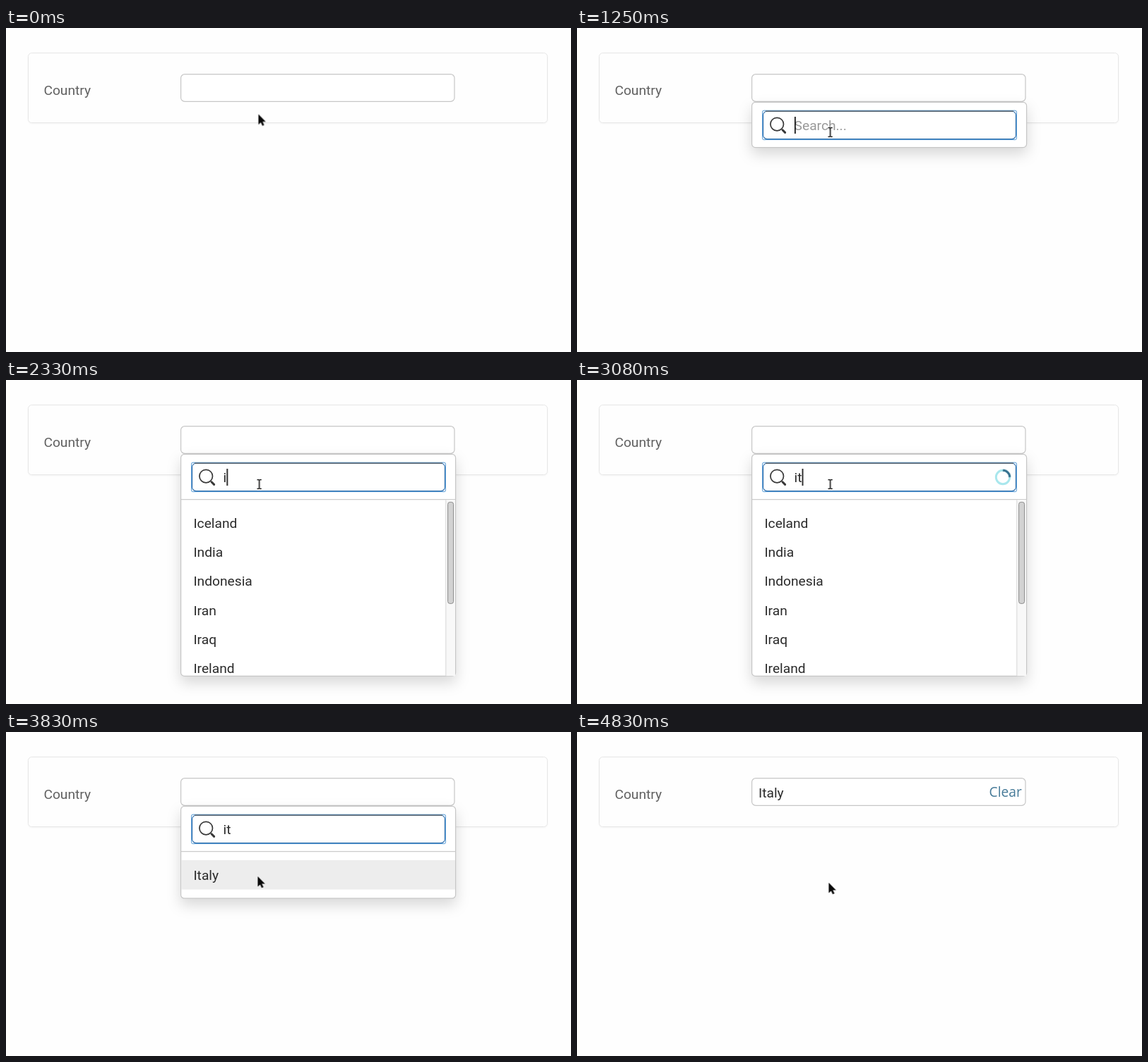
Write an HTML page that moves like this. It is 800x460 px and loops after 6010 ms.

```html
<!DOCTYPE html>
<html lang="en">
<head>
<meta charset="utf-8">
<title>Country picker</title>
<style>
  html, body { margin: 0; width: 100%; height: 100%; overflow: hidden; background: #fefefe; }
  svg { display: block; width: 800px; height: 460px; }
  text { font: 19.2px Roboto, sans-serif; fill: #2b2b2b; }
  .label { fill: #616161; }
  .hint { fill: #999; }
  .clear { font-family: "Open Sans", sans-serif; fill: #467a98; }
  .card { fill: #fefefe; stroke: #e6e6e6; filter: drop-shadow(0 1px 1px rgba(0, 0, 0, .04)); }
  .box { fill: #fff; stroke: #c6c6c6; stroke-width: 1.2; }
  .shadow { filter: drop-shadow(0 9px 9.6px rgba(0, 0, 0, .15)); }
  .line { fill: none; stroke: #ccc; stroke-width: 1.2; }
  .ring { fill: none; stroke: #4a94d4; }
  .inner { fill: none; stroke: #2b6cab; stroke-width: 1.1; }
  .icon { fill: none; stroke: #383838; stroke-width: 1.7; stroke-linecap: round; }
  .spin { fill: none; stroke: #a9e7ed; stroke-width: 2.9; }
  #arc { stroke: #356f8d; transform-origin: 603px 138px; }
  .pointer { fill: #0a0a0a; stroke: #fff; stroke-width: .9; paint-order: stroke; filter: drop-shadow(.8px .8px .5px rgba(0, 0, 0, .35)); }
</style>
</head>
<body>
<svg viewBox="0 0 800 460">
  <rect class="card" x="31.5" y="35.5" width="735" height="99" rx="5"/>
  <text class="label" x="53.4" y="95">Country</text>
  <rect class="box" x="247.6" y="65.6" width="387.4" height="38.8" rx="5.5"/>
  <g id="chosen">
    <text x="257" y="92.5">Italy</text>
    <text class="clear" x="583.6" y="92.3">Clear</text>
  </g>

  <g id="popup">
    <rect id="panel" class="box shadow" x="247.6" y="105.4" width="389" height="64.2" rx="5"/>
    <path id="divider" class="line" d="M248 169.6H636"/>

    <rect class="ring" x="262.6" y="117.2" width="359.8" height="41.4" rx="2"/>
    <rect class="inner" x="263.6" y="118.2" width="357.8" height="39.4" rx="5.5"/>
    <path class="line" style="stroke:#5c5c5c" d="M267 118.2H618"/>
    <circle class="icon" cx="283.2" cy="136.6" r="9.3"/>
    <path class="icon" style="stroke-width:3" d="M291 144.8L294.6 148.4"/>

    <text class="hint" id="hint" x="307.6" y="144.8">Search...</text>
    <text id="typedI" x="307.6" y="144.8">i</text>
    <text id="typedIt" x="307.6" y="144.8">it</text>
    <rect id="caret" x="308" y="126" width="1.7" height="24" fill="#111"/>

    <g id="spinner" class="spin">
      <circle cx="603" cy="138" r="9.7"/>
      <path id="arc" d="M596.14 131.14A9.7 9.7 0 0 1 609.86 131.14"/>
    </g>

    <g id="list">
      <rect x="622.8" y="170.2" width="13.2" height="250" fill="#f8f8f8"/>
      <path class="line" style="stroke:#ddd" d="M622.8 170.2V420"/>
      <rect x="625.6" y="173.4" width="8" height="144" rx="3" fill="#d2d2d2" stroke="#8a8a8a"/>
    </g>
    <g id="match">
      <rect id="hover" x="248.2" y="182" width="387.8" height="41.6" fill="#ededed"/>
      <text x="265.4" y="210">Italy</text>
    </g>
  </g>

  <g id="cursor">
    <path id="arrow" class="pointer" d="M0 0V14.4L3.3 11.4L5.6 16.3L8 15.2L5.8 10.4H10.2Z"/>
    <g id="hand" class="pointer">
      <path d="M-.9 -.6Q.6 -1.9 1.6 0L3 4L7.6 4.9Q9 5.4 8.8 7L8.2 10.2H-.4L-4.5 6.6Q-5 5 -3.3 4.9L.2 6Z"/>
      <path d="M-1 10.9H8.5V13.6H-1Z"/>
    </g>
    <path id="beam" class="pointer" d="M-3 -7H-.8L0 -6.3L.8 -7H3V-5.7H.7V5.7H3V7H.8L0 6.3L-.8 7H-3V5.7H-.7V-5.7H-3Z"/>
  </g>
</svg>
<script>
const LOOP = 6010;
const el = id => document.getElementById(id);

// Holds each value from its time until the next one.
function play(id, prop, steps) {
  const frames = steps.map(([t, v]) => ({ offset: t / LOOP, [prop]: v, easing: 'step-end' }));
  frames.push({ offset: 1, [prop]: steps.at(-1)[1] });
  el(id).animate(frames, { duration: LOOP, iterations: Infinity });
}

// Starts hidden and flips at each given time.
function toggle(id, ...times) {
  play(id, 'opacity', [0, ...times].map((t, i) => [t, i % 2]));
}

const countries = ['Iceland', 'India', 'Indonesia', 'Iran', 'Iraq', 'Ireland'];
countries.forEach((name, i) => {
  const row = document.createElementNS('http://www.w3.org/2000/svg', 'text');
  row.setAttribute('x', 265.4);
  row.setAttribute('y', 210 + i * 41.2);
  row.textContent = name;
  el('list').append(row);
});

play('popup', 'opacity', [[0, 0], [670, .6], [750, 1], [4750, .4], [4830, 0]]);
play('panel', 'height', [[0, '64.2px'], [1830, '89px'], [2330, '315px'], [3170, '130.8px']]);
toggle('divider', 1830);
toggle('hint', 670, 1750);
toggle('typedI', 1750, 2670);
toggle('typedIt', 2670);
toggle('list', 2330, 3170);
toggle('match', 3170);
toggle('hover', 3750);
toggle('chosen', 4750);

toggle('caret', 750, 1830, 2330, 3170, 4170);
play('caret', 'transform', [[0, 0], [1750, 4.4], [2670, 10.6]].map(([t, x]) => [t, `translate(${x}px)`]));

// The spinner turns once in 800 ms, drawn at 12 steps a second.
toggle('spinner', 1830, 2330, 2750, 3170);
const turns = [[0, 'rotate(0deg)']];
for (let n = 21; n <= 38; n++) {
  const t = Math.round(n * 100 / 12) * 10;
  turns.push([t, `rotate(${(t - 2180) * .45}deg)`]);
}
play('arc', 'transform', turns);

const path = [
  [0, 357.5, 122.5, 'arrow'], [80, 353, 109, 'arrow'], [170, 346, 92, 'hand'], [250, 343, 86, 'hand'],
  [1000, 347, 93, 'hand'], [1080, 356, 110, 'arrow'], [1170, 358, 138, 'beam'], [1250, 358.6, 148, 'beam'],
  [3670, 356.5, 182, 'arrow'], [3750, 356.5, 191, 'arrow'], [3830, 356.5, 205, 'arrow'], [3920, 356.5, 214, 'arrow'],
  [4250, 356.5, 214, 'hand'], [4830, 356.5, 214, 'arrow']
];
play('cursor', 'transform', path.map(([t, x, y]) => [t, `translate(${x}px, ${y}px)`]));
for (const kind of ['arrow', 'hand', 'beam'])
  play(kind, 'opacity', path.map(p => [p[0], +(p[3] === kind)]));
</script>
</body>
</html>
```
